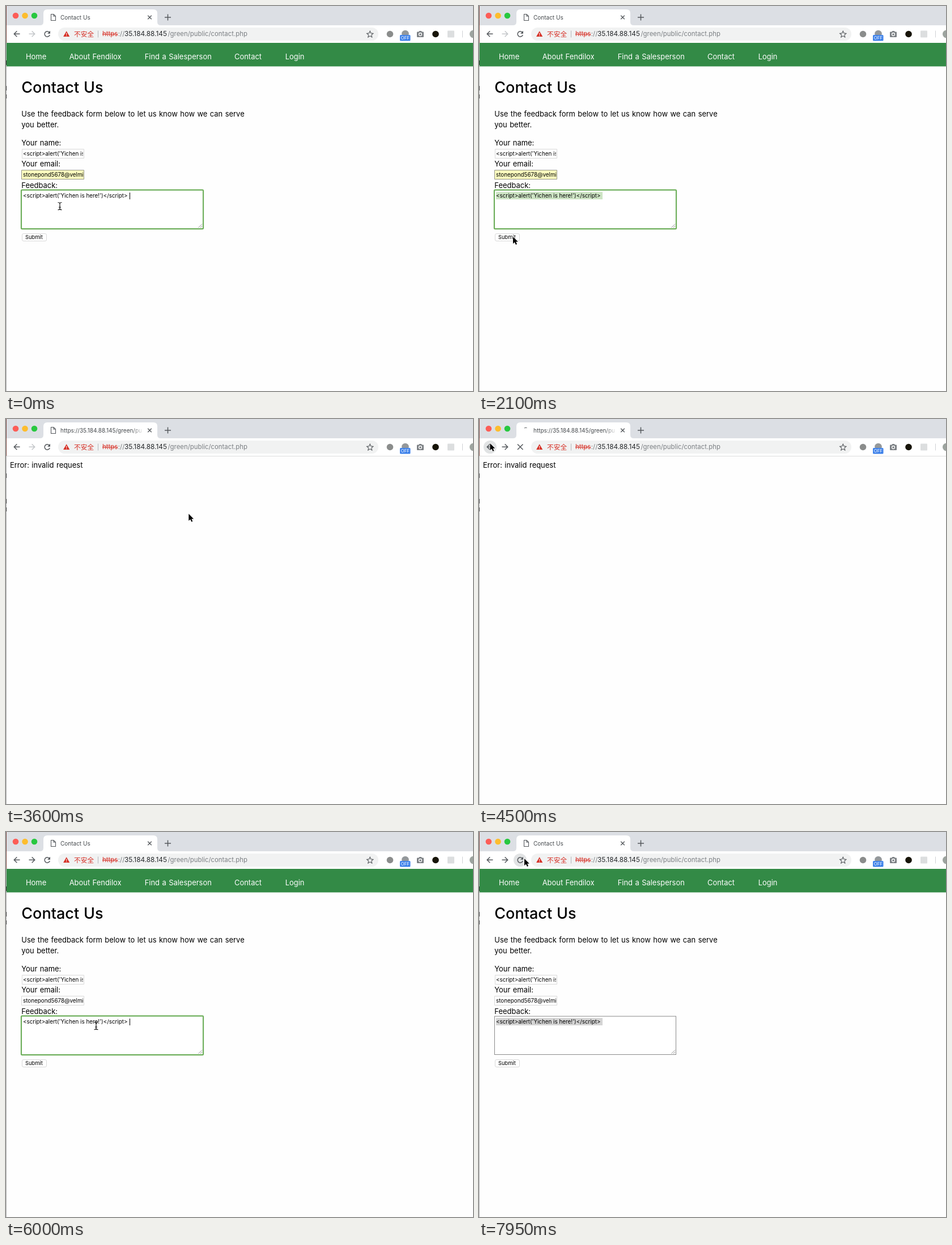
An HTML page for the animation above (8 s loop, 824 by 679 pixels).

```html
<!DOCTYPE html>
<html lang="en">
<head>
<meta charset="utf-8">
<title>Contact Us</title>
<style>
  html, body { margin: 0; width: 100%; height: 100%; overflow: hidden; background: #fefefe; }
  svg { display: block; }
  text { font-family: Inter, "Noto Sans CJK SC", "Noto Sans CJK", sans-serif; }
  .page text { font-size: 12.95px; word-spacing: .8px; }
  .page .field { font-size: 9.85px; word-spacing: 0; }
  .tab { font-size: 10px; fill: #45494d; }
  .url { font-size: 11.38px; }
  .line { fill: none; stroke: #55595d; stroke-width: 1.5; }
  .box { fill: #fff; stroke: #d9d9d9; }
</style>
</head>
<body>
<svg width="824" height="679" viewBox="0 0 824 679">
  <defs>
    <linearGradient id="fade" gradientUnits="userSpaceOnUse" x1="222" x2="243" y1="0" y2="0">
      <stop stop-color="#45494d"/><stop offset="1" stop-color="#45494d" stop-opacity="0"/>
    </linearGradient>
    <clipPath id="inputClip"><path d="M29 250h107v60H29z"/></clipPath>
    <filter id="glow" x="-5%" y="-15%" width="110%" height="130%"><feGaussianBlur stdDeviation=".6"/></filter>
  </defs>

  <!-- tab strip -->
  <path fill="#dcdfe4" d="M0 0h824v34H0z"/>
  <circle cx="17" cy="17" r="5.3" fill="#fc5d57"/>
  <circle cx="33.5" cy="17" r="5.3" fill="#fdbd2e"/>
  <circle cx="50" cy="17" r="5.3" fill="#28c840"/>
  <path fill="#fff" d="M60 34q6 0 6-6V13q0-7 7-7H260q7 0 7 7v15q0 6 6 6v31H0V34z"/>
  <path fill="#fff" d="M0 34h824v31H0z"/>
  <path id="docIcon" class="line" style="stroke-width:1.1" d="M79.5 14.5h4.5l3.5 3.5v7.5h-8zM84 14.5V18h3.5"/>
  <path id="spinner" class="line" style="stroke-width:1" d="M80 16q2-1.4 4.5-.4"/>
  <text id="tabTitle" class="tab" x="96" y="23.5">Contact Us</text>
  <text id="tabUrl" class="tab" x="96" y="23.5" style="fill:url(#fade)">https://35.184.88.145/green/pu</text>
  <path class="line" style="stroke-width:1.3" d="M250.2 16.7l6.6 6.6m0-6.6l-6.6 6.6"/>
  <path class="line" d="M280 20h11M285.5 14.5v11"/>

  <!-- toolbar -->
  <circle id="backHover" cx="19.5" cy="49.5" r="11.5" fill="#e1e3e4"/>
  <circle id="reloadHover" cx="72.5" cy="49.5" r="11.5" fill="#e1e3e4"/>
  <path class="line" d="M24.5 49.3H14.5M19.3 44.3l-5 5 5 5"/>
  <path id="forward" class="line" d="M40.5 49.3h10M45.7 44.3l5 5-5 5"/>
  <g id="reload">
    <path class="line" d="M76.3 46.2a4.7 4.7 0 1 0 1 4.8"/>
    <path fill="#55595d" d="M78 43.7v5h-5z"/>
  </g>
  <path id="stop" class="line" d="M68 44.5l9.5 9.5m0-9.5L68 54"/>
  <rect x="92" y="38" width="565" height="23" rx="11.5" fill="#f1f2f2"/>
  <path fill="#d62f25" d="M106.7 44.3l5.6 9.7h-11.2z"/>
  <path stroke="#fff" stroke-width="1.1" d="M106.7 47.5v3.2m0 1v1.2"/>
  <text x="120" y="53.6" font-size="11.7" fill="#d62f25">不安全</text>
  <path stroke="#b4b7ba" d="M162.5 43.5v12"/>
  <g class="url">
    <text x="170" y="53.4" fill="#d62f25" text-decoration="line-through">https</text>
    <text x="197.8" y="53.4" fill="#7b7f83">://</text>
    <text x="209" y="53.4" fill="#25282b" font-size="11.8">35.184.88.145</text>
    <text x="285.5" y="53.4" fill="#7b7f83">/green/public/contact.php</text>
  </g>
  <path class="line" style="stroke-width:1.1" d="M642.3 44.2l1.6 3.7 4 .4-3 2.7.9 4-3.5-2.1-3.5 2.1.9-4-3-2.7 4-.4z"/>
  <circle cx="677.5" cy="49.5" r="5.8" fill="#8b8d8c"/>
  <circle cx="704.5" cy="49" r="6.3" fill="#94989b"/>
  <rect x="695" y="51" width="18.5" height="10.5" rx="1.5" fill="#3f82ea"/>
  <text x="704.3" y="59.3" font-size="7.8" fill="#fff" text-anchor="middle">OFF</text>
  <path fill="#7c8084" d="M726 45.5h2.3l1-1.5h3.6l1 1.5h2.1q1 0 1 1v7.5q0 1-1 1h-10q-1 0-1-1v-7.5q0-1 1-1z"/>
  <circle cx="731" cy="50" r="2.5" fill="#7c8084" stroke="#fff" stroke-width="1.3"/>
  <circle cx="758" cy="49.5" r="5.8" fill="#171408"/>
  <rect x="779" y="43.5" width="12" height="12" rx="1" fill="#dcdedf"/>
  <path stroke="#d0d2d4" d="M805.5 43.5v12"/>
  <circle cx="825" cy="49.5" r="7" fill="#9da49f"/>
  <path stroke="#dcdcdc" d="M0 65.5h824"/>

  <!-- form page -->
  <g id="form" class="page">
    <path fill="#338a46" d="M0 65h824v41.6H0z"/>
    <g fill="#fff">
      <text x="35" y="94">Home</text>
      <text x="111.7" y="94">About Fendilox</text>
      <text x="244.7" y="94">Find a Salesperson</text>
      <text x="403" y="94">Contact</text>
      <text x="492.7" y="94">Login</text>
    </g>
    <text x="27.3" y="153.3" style="font-size:27px;font-weight:500">Contact Us</text>
    <text x="27.3" y="195">Use the feedback form below to let us know how we can serve</text>
    <text x="27.3" y="213.6">you better.</text>
    <text x="27.3" y="245.5">Your name:</text>
    <text x="27.3" y="283">Your email:</text>
    <text x="27.3" y="320.6">Feedback:</text>
    <path class="box" d="M28.5 252.5h109v16h-109z"/>
    <path id="email" class="box" d="M27.5 289.5h110v16h-110z"/>
    <g clip-path="url(#inputClip)">
      <text class="field" x="30" y="263.6">&lt;script&gt;alert('Yichen is here!')&lt;/script&gt;</text>
      <text class="field" x="30" y="301.3">stonepond5678@velmi.example</text>
    </g>
    <rect id="halo" x="27" y="324.5" width="321" height="68.5" rx="1.5" fill="none" stroke="#7cb86a" stroke-width="2.4" filter="url(#glow)"/>
    <rect id="area" x="27.5" y="325" width="320" height="67.5" fill="#fff"/>
    <path stroke="#777" stroke-width=".8" d="M339.5 391l6.5-6.5M343 391l3-3"/>
    <rect id="selection" x="30" y="328" height="13"/>
    <text class="field" x="30" y="338.4">&lt;script&gt;alert('Yichen is here!')&lt;/script&gt;</text>
    <path id="caret" stroke="#000" d="M218.5 329v12"/>
    <rect class="box" x="28.5" y="401.5" width="43" height="13" rx="2.5"/>
    <text x="34" y="411.3" style="font-size:9.4px">Submit</text>
  </g>

  <g id="error" class="page"><text x="7" y="86.4">Error: invalid request</text></g>

  <!-- sliver of the window behind -->
  <path fill="#b5b5b5" d="M0 65h1v614H0z"/>
  <path fill="#7d4a42" d="M0 0h1v65H0z"/>
  <path fill="#333" d="M0 96h1v8H0zM0 141h1v8H0zM0 156h1v7H0z"/>

  <path id="arrow" fill="#000" stroke="#fff" stroke-width="1.4" paint-order="stroke" d="M0 0V12.2L2.9 9.6 4.9 14 7 13.1 5.1 8.8H8.8z"/>
  <path id="beam" fill="none" stroke="#111" stroke-width="1.2" d="M-3.5-6.5Q-.5-6.5 0-5Q.5-6.5 3.5-6.5M0-5V5M-3.5 6.5Q-.5 6.5 0 5Q.5 6.5 3.5 6.5M-2 2H2"/>
</svg>
<script>
const LOOP = 8000, STEP = 150;
const $ = id => document.getElementById(id);
const show = (id, on) => { $(id).style.display = on ? '' : 'none'; };

// pointer path: time, x, y
const path = [
  [0, 95, 353], [150, 50, 345], [300, 8, 335], [450, 110, 332], [600, 251, 326],
  [750, 248, 330], [900, 248, 330], [1050, 240, 318], [1350, 170, 352], [1650, 84, 398],
  [1950, 60, 407], [2250, 60, 407], [2550, 210, 378], [3000, 472, 235], [3150, 471.5, 234.5],
  [3300, 471.5, 234.5], [4200, 24, 33], [4350, 19.5, 43], [4650, 19.5, 43], [5400, 110, 132],
  [6000, 159, 342], [6600, 159, 342], [7350, 45, 1], [7650, 86, 56], [7800, 82, 50], [7950, 80, 47]
];

function pointer(t) {
  const i = path.findIndex(k => k[0] >= t);
  if (i < 1) return path[0].slice(1);
  const [t0, x0, y0] = path[i - 1], [t1, x1, y1] = path[i];
  const u = (t - t0) / (t1 - t0);
  return [x0 + (x1 - x0) * u, y0 + (y1 - y0) * u];
}

function draw(ms) {
  const t = Math.floor(ms % LOOP / STEP) * STEP;
  const [x, y] = pointer(t);
  const error = t >= 2400 && t < 4650;
  const loading = t === 2250 || t === 4500;
  const focus = t < 2400 || t >= 5850 && t < 7800;
  const over = (cx, cy) => Math.hypot(x - cx, y - cy) < 12;

  show('form', !error);
  show('error', error);
  show('tabTitle', !error);
  show('tabUrl', error);
  show('docIcon', !loading);
  show('spinner', loading);
  show('reload', !loading);
  show('stop', loading);
  show('backHover', over(19.5, 49.5));
  show('reloadHover', over(72.5, 49.5));
  $('forward').style.stroke = t < 4500 ? '#c3c6c9' : '';

  $('email').style.fill = t < 2400 ? '#fafabe' : '';
  $('email').style.stroke = t < 2400 ? '#98988a' : '';
  show('halo', focus);
  $('area').setAttribute('stroke', focus ? '#5fa54c' : '#8a8a8a');

  let selected = 0;
  if (t >= 300 && t < 2400) selected = t < 600 ? Math.max(0, x - 30) : 188;
  if (t >= 6300) selected = 188;
  $('selection').setAttribute('width', selected);
  $('selection').setAttribute('fill', focus ? '#cde4c4' : '#d4d4d4');
  show('caret', focus && !selected);

  const inArea = !error && x > 27 && x < 348 && y > 325 && y < 393;
  const beam = t < 1200 || inArea;
  show('beam', beam);
  show('arrow', !beam);
  $(beam ? 'beam' : 'arrow').setAttribute('transform', `translate(${x} ${y})`);
}

const start = performance.now();
function tick() {
  draw(performance.now() - start);
  requestAnimationFrame(tick);
}
tick();
</script>
</body>
</html>
```
